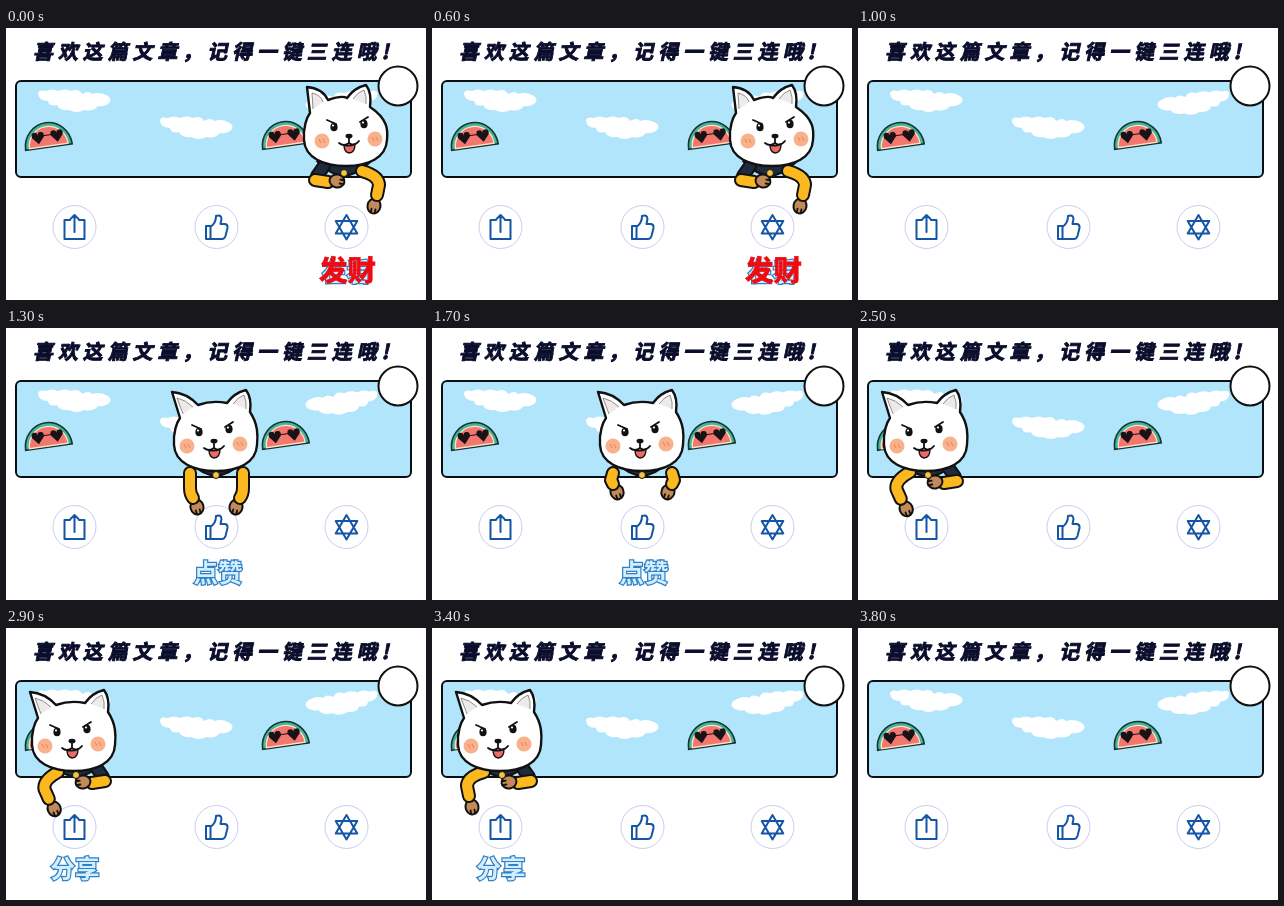
Recreate the animation shown at these times as an HTML page. Size 420 by 272 pixels, loop 3.9 s.

```html
<!DOCTYPE html>
<html lang="zh">
<head>
<meta charset="utf-8">
<style>
html, body { margin: 0; width: 100%; height: 100%; overflow: hidden; background: #fff; }
svg { display: block; width: 420px; height: 272px; }
text { font-family: "Noto Sans CJK SC", "Noto Sans CJK", sans-serif; font-weight: 900; }
.title { font-size: 20px; letter-spacing: 4.9px; fill: #0a0d2b; stroke: #0a0d2b; stroke-width: .9; }
.label { font-size: 24.5px; fill: #d3efff; stroke: #2f80c5; stroke-width: 2.4; paint-order: stroke; }
.red { font-size: 28.5px; fill: #f00b12; stroke: #f00b12; stroke-width: .8; }
.icon { fill: none; stroke: #1555a5; stroke-width: 2; stroke-linejoin: round; stroke-linecap: round; }
.line { fill: none; stroke: #111; stroke-width: 1.8; stroke-linecap: round; stroke-linejoin: round; }
</style>
</head>
<body>
<svg viewBox="0 0 420 272">
  <defs>
    <path id="cloud" fill="#fff" d="M0 6Q0 1 8 3Q14 0 20 3Q27 0 33 3Q41 0 44 6Q51 2 54 6Q62 3 70 8Q75 12 70 16Q65 19 60 18Q55 24 46 22Q39 26 31 22Q21 23 19 17Q11 19 10 13Q1 13 0 6Z"/>
    <path id="heart" d="M0 7L-6 0Q-7-5-3-5Q0-5 0-2Q0-5 3-5Q7-5 6 0Z" fill="#191318"/>
    <g id="melon">
      <path d="M-23.500 3A23.500 24.500 0 0 1 23.500 3Z" fill="#42b59b" stroke="#16332f" stroke-width="1.600"/>
      <path d="M-19.500 2A19.500 19.500 0 0 1 19.500 2Z" fill="#f4776f" stroke="#fbe3c9" stroke-width="1.300"/>
      <path d="M-6-9H6" stroke="#191318"/>
      <use href="#heart" x="-9.500" y="-8"/><use href="#heart" x="9.500" y="-8"/>
    </g>
    <g id="face">
      <g fill="#f8b18b"><circle cx="-29" cy="11" r="7.500"/><circle cx="24" cy="9" r="7.500"/></g>
      <path d="M-32 9l2 4M-28 9l2 4M21 7l2 4M25 7l2 4" stroke="#ec7f58"/>
      <path class="line" d="M-24-10L-15-6M9-8L17-13"/>
      <ellipse cx="-17" cy="-3" rx="3.600" ry="4.300" fill="#111"/>
      <ellipse cx="13" cy="-6" rx="3.600" ry="4.300" fill="#111"/>
      <g fill="#fff"><circle cx="-18" cy="-4.500" r="1.100"/><circle cx="12" cy="-7.500" r="1.100"/></g>
      <ellipse cx="-2" cy="6" rx="3.500" ry="2.300" fill="#111"/>
      <path d="M-7 15Q-2 17 4 14Q4 23-2 23Q-7 22-7 15Z" fill="#ef6a66" stroke="#111" stroke-width="1.400"/>
      <path class="line" d="M-2 7V13M-12 13Q-7 17-2 13Q3 17 8 11"/>
    </g>
  </defs>

  <text class="title" transform="translate(27 31) skewX(-12)">喜欢这篇文章，记得一键三连哦!</text>
  <rect x="10" y="53" width="395" height="96" rx="5" fill="#b1e5fb" stroke="#0b0f14" stroke-width="2"/>
  <use href="#cloud" x="32" y="60"/>
  <use href="#cloud" x="154" y="87"/>
  <use href="#cloud" transform="translate(371 60) rotate(-4) scale(-1 1)"/>
  <use href="#melon" transform="translate(42.500 116) rotate(-8)"/>
  <use href="#melon" transform="translate(279.500 115) rotate(-8)"/>

  <g fill="#fff" stroke="#c8cdef">
    <circle cx="68.500" cy="199" r="21.500"/><circle cx="210.500" cy="199" r="21.500"/><circle cx="340.500" cy="199" r="21.500"/>
  </g>
  <g class="icon">
    <path d="M64 192H58.500V211H78.500V192H73M68.500 204V187M64.500 191L68.500 187L72.500 191"/>
    <path d="M200 198H204.500V211H200ZM204.500 199Q210 195 210 188Q215 186 215.500 191L214.500 196H219Q222 196.500 221.500 200L219.500 208Q218.500 211 216 211H204.500"/>
    <path d="M340.500 187L351.300 205.500H329.700ZM340.500 211.500L329.700 193H351.300Z"/>
  </g>
  <g id="dogs"></g>
  <circle cx="392" cy="58" r="19.500" fill="#fff" stroke="#111" stroke-width="2"/>
  <g id="labels">
    <g><text class="label" x="316" y="253">在看</text><text class="red" x="313" y="252.500">发财</text></g>
    <text class="label" x="187.500" y="254">点赞</text>
    <text class="label" x="44.500" y="249.500">分享</text>
  </g>
</svg>
<script>
const $ = id => document.getElementById(id);

const stroke = (d, color, width) => `<path d="${d}" fill="none" stroke="${color}"
  stroke-width="${width}" stroke-linejoin="round" stroke-linecap="round"/>`;
const sleeve = (d, color = '#fbb91f') => stroke(d, '#111', 14) + stroke(d, color, 10);
const paw = (x, y, turn) => `
  <g transform="translate(${x} ${y}) rotate(${turn})">
    <ellipse rx="6.500" ry="7.500" fill="#c28a58" stroke="#111" stroke-width="2"/>
    <path class="line" d="M-2 3v4M2 3v4"/>
  </g>`;
const bell = (x, y) => `<circle cx="${x}" cy="${y}" r="3.500" fill="#f4c341" stroke="#111"/>`;
const chest = x => `<path d="M${x - 26} 134Q${x} 161 ${x + 26} 134Z" fill="#202a3d" stroke="#111" stroke-width="2"/>`;

// look turns the head sideways: the face and near ear move, the far ear moves back
const head = (x, y, look = 0) => {
  const near = look - 44, far = 30 - 2 * look;
  return `<g transform="translate(${x} ${y})">
    <path d="M-42 10C-43-3-39-13-36-17L${near}-43Q${near + 15}-42-18-30Q-4-35 ${far - 19}-32Q${far - 12}-42 ${far}-45
      Q${far + 6}-37 ${far + 4}-23C42-11 42 0 41 10C40 28 22 36 0 36C-22 36-41 28-42 10Z"
      fill="#fff" stroke="#111" stroke-width="2.400" stroke-linejoin="round"/>
    <path d="M-33-21L${near + 5}-37Q${near + 14}-35-23-28M${far - 13}-31Q${far - 8}-38 ${far - 2}-40Q${far + 1}-33 ${far}-26"
      fill="#eeeaea" stroke="#777" stroke-width=".8"/>
    <use href="#face" x="${look}"/>
  </g>`;
};

// One arm folded on the frame, the other reaching down and swung by an angle
const leaning = swing => chest(338) +
  sleeve('M318 138L311 148', '#202a3d') + sleeve('M309 152L322 154') + paw(331, 153, -80) +
  `<g transform="rotate(${swing} 356 143)">${paw(368, 178, 10)}${sleeve('M356 143Q373 148 373 157L371 167')}</g>`;
const hanging = (path, x, y, turn) => {
  const arm = paw(x, y, turn) + sleeve(path);
  return chest(210) + arm + `<g transform="translate(421) scale(-1 1)">${arm}</g>`;
};

// Each dog has a pressing pose and a resting pose
const poses = [
  [0, 13].map(swing => leaning(swing) + head(340, 102, 5) + bell(338, 145)),
  [hanging('M184 145V160Q184 166 187 170', 191, 179, -15), hanging('M181 145L179 152L181 156', 185, 164, -20)]
    .map(body => body + head(210, 107) + bell(210, 147)),
  [0, 13].map(swing => `<g transform="translate(408 1) scale(-1 1)">${leaning(swing)}</g>` + head(68, 107) + bell(70, 147))
];

$('dogs').innerHTML = poses.flat().map(pose => `<g>${pose}</g>`).join('');
const dogs = [...$('dogs').children], labels = [...$('labels').children];

// Visible intervals in ms; a dog taps while its label shows
const turns = [
  { dog: [0, 1000], label: [0, 800] },
  { dog: [1200, 2400], label: [1300, 2000] },
  { dog: [2500, 3700], label: [2600, 3600] }
];
const beat = 300;
const within = (t, [from, to]) => t >= from && t < to;
const show = (el, on) => el.style.display = on ? '' : 'none';

function draw() {
  const t = Math.floor(performance.now() % 3900 / 100) * 100;
  turns.forEach(({ dog, label }, i) => {
    const labelled = within(t, label);
    const pose = labelled ? Math.floor((t - label[0]) / beat) % 2 : 1;
    show(labels[i], labelled);
    [0, 1].forEach(k => show(dogs[i * 2 + k], within(t, dog) && k === pose));
  });
  requestAnimationFrame(draw);
}
draw();
</script>
</body>
</html>
```
